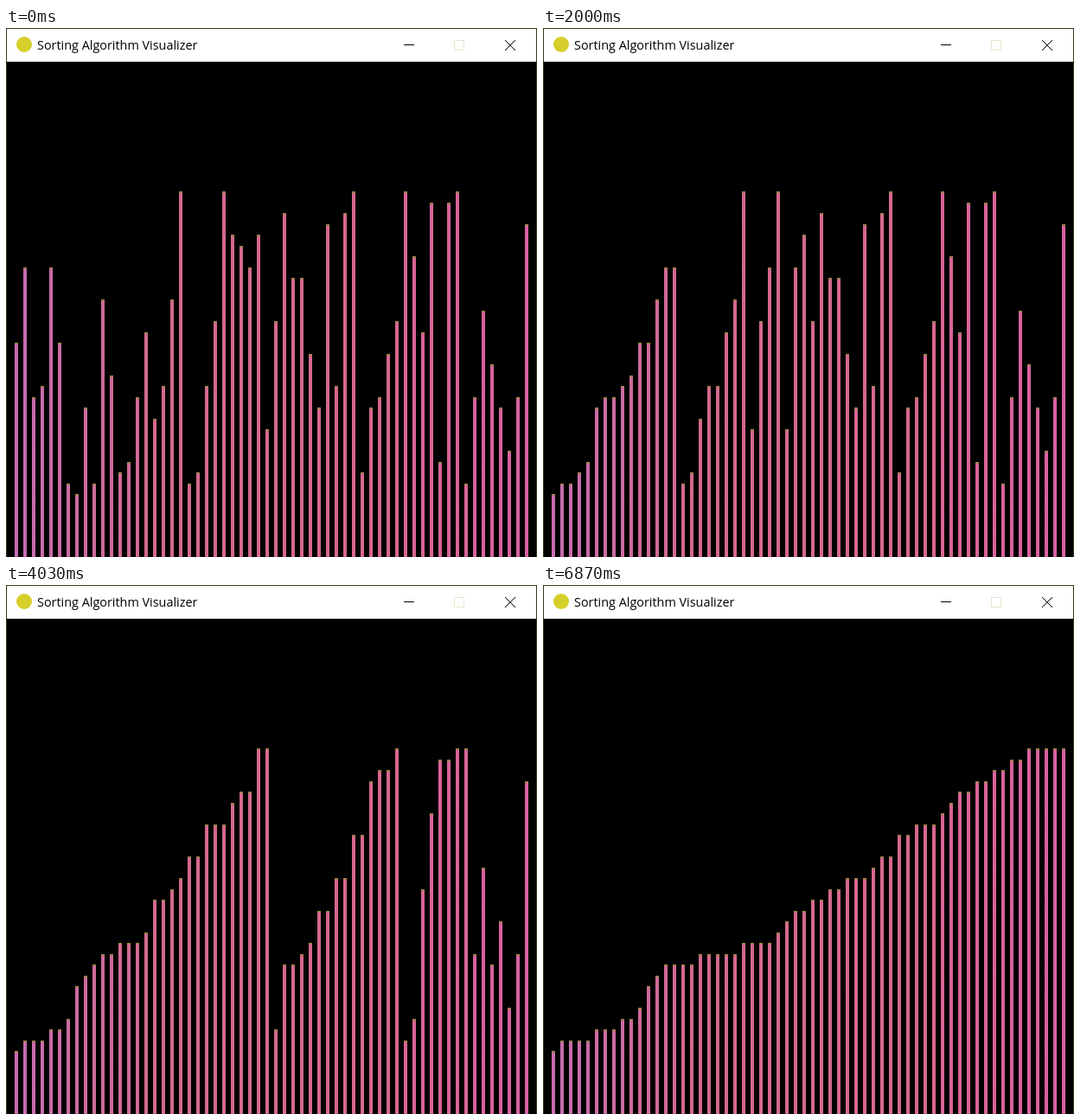
These frames come from a looping animation (614 px wide and 612 px high, 6.91 s). An HTML page with a canvas:

```html
<!DOCTYPE html>
<html lang="en">
<head>
<meta charset="utf-8">
<title>Sorting Algorithm Visualizer</title>
<style>
  html, body { margin: 0; width: 100%; height: 100%; overflow: hidden; background: #000; }
  canvas { display: block; }
</style>
</head>
<body>
<canvas id="stage" width="614" height="612"></canvas>
<script>
const ctx = document.getElementById('stage').getContext('2d');
const LOOP = 6910;
const START = [
  14, 21, 9, 10, 21, 14, 1, 0, 8, 1, 18, 11, 2, 3, 9, 15, 7, 10, 18, 28,
  1, 2, 10, 16, 28, 24, 23, 21, 24, 6, 16, 26, 20, 20, 13, 8, 25, 10, 26, 28,
  2, 8, 9, 13, 16, 28, 22, 15, 27, 3, 27, 28, 1, 9, 17, 12, 8, 4, 9, 25];

// Pace of the sort: [time in ms, writes done]
const PACE = [[525, 0], [1270, 50], [2000, 99], [3530, 202], [4530, 269], [5470, 328], [5890, 356]];

// Merge sort that records every write
const writes = [];
function mergeSort(a, lo, hi) {
  if (lo >= hi) return;
  const mid = (lo + hi) >> 1;
  mergeSort(a, lo, mid);
  mergeSort(a, mid + 1, hi);
  const left = a.slice(lo, mid + 1), right = a.slice(mid + 1, hi + 1);
  for (let i = lo; i <= hi; i++) {
    const takeLeft = !right.length || left[0] <= right[0];
    a[i] = takeLeft ? left.shift() : right.shift();
    writes.push([i, a[i]]);
  }
}
mergeSort([...START], 0, START.length - 1);

function writesAt(t) {
  if (t <= PACE[0][0]) return 0;
  const k = PACE.findIndex(p => p[0] > t);
  if (k < 0) return writes.length;
  const [t0, n0] = PACE[k - 1], [t1, n1] = PACE[k];
  return Math.floor(n0 + (n1 - n0) * (t - t0) / (t1 - t0));
}

function rect(color, x, y, w, h) {
  ctx.fillStyle = color;
  ctx.fillRect(x, y, w, h);
}

function strokePath(color, ...lines) {
  ctx.strokeStyle = color;
  ctx.beginPath();
  for (const [x0, y0, x1, y1] of lines) {
    ctx.moveTo(x0, y0);
    ctx.lineTo(x1, y1);
  }
  ctx.stroke();
}

const barPaint = ctx.createLinearGradient(0, 0, 614, 0);
barPaint.addColorStop(0, '#c66cb2');
barPaint.addColorStop(0.3, '#d4698c');
barPaint.addColorStop(0.7, '#d8678f');
barPaint.addColorStop(1, '#d860a4');

function drawWindow() {
  rect('#fff', 0, 0, 614, 39);
  ctx.lineWidth = 1;
  ctx.strokeStyle = '#38381c';
  ctx.strokeRect(0.5, 0.5, 613, 620);

  ctx.fillStyle = '#d6cf2a';
  ctx.beginPath();
  ctx.arc(21, 19, 9, 0, 7);
  ctx.fill();

  ctx.fillStyle = '#000';
  ctx.font = '14.4px "Open Sans", "Noto Sans", sans-serif';
  ctx.fillText('Sorting Algorithm Visualizer', 36, 25);

  strokePath('#000', [460, 19.5, 472, 19.5], [577, 14, 589, 26], [589, 14, 577, 26]);
  ctx.strokeStyle = '#e6e6d2';
  ctx.strokeRect(518.5, 14.5, 11, 11);
}

function draw(t) {
  const values = [...START];
  for (const [i, v] of writes.slice(0, writesAt(t))) values[i] = v;
  rect('#000', 0, 0, 614, 612);
  drawWindow();
  values.forEach((v, i) => {
    const x = 10 + 10 * i, y = Math.floor(539.5 - 12.5 * v);
    rect(barPaint, x, y, 4, 612 - y);
    rect('#a08050', x, y, 4, 2);
  });
}

function tick() {
  const t = performance.now() % LOOP, rest = t % 100;
  draw(t - rest + (rest < 30 ? 0 : rest < 70 ? 30 : 70));
  requestAnimationFrame(tick);
}
tick();
</script>
</body>
</html>
```
